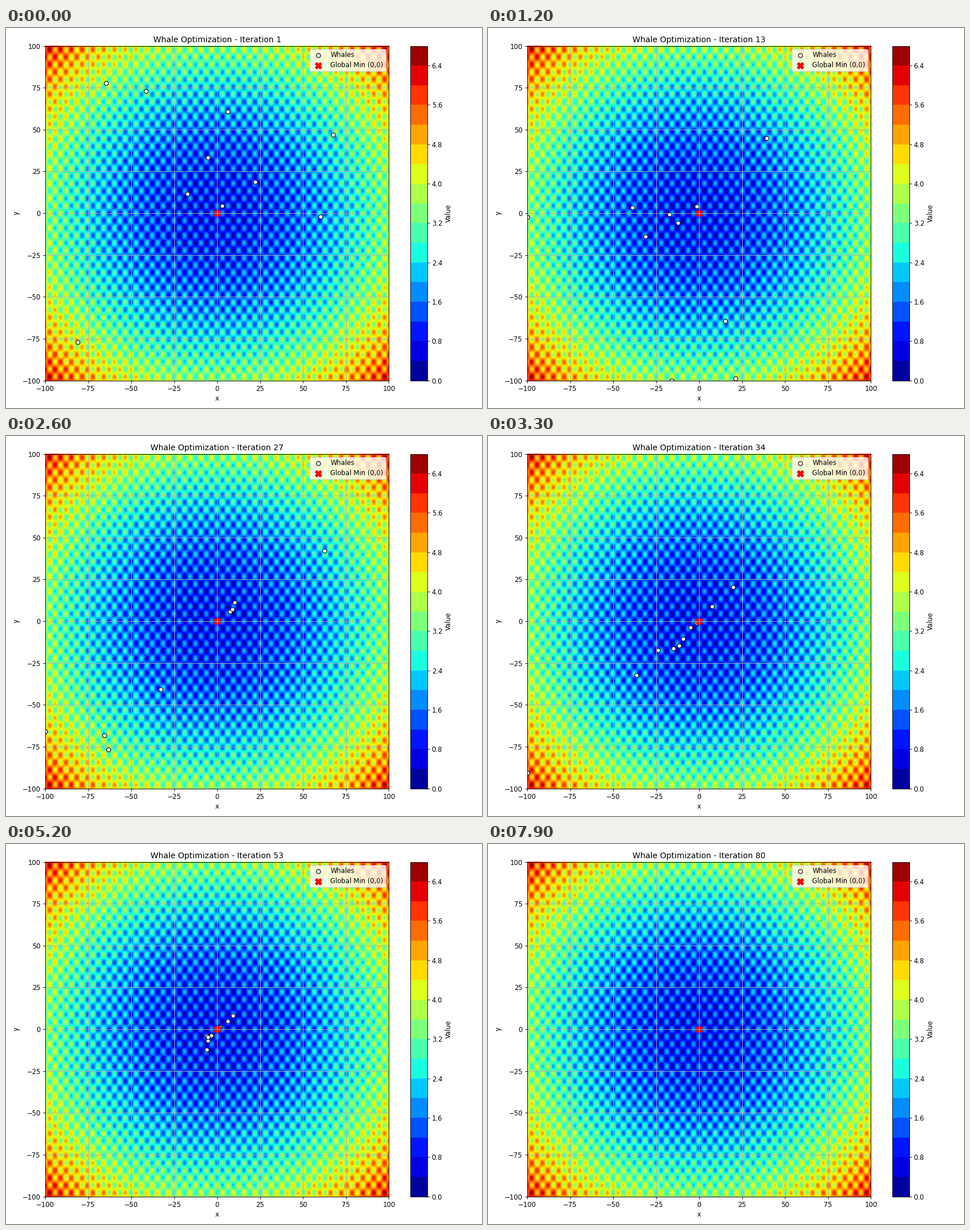
Write a matplotlib script that moves like this. It is 837 px wide and 669 px high and loops after 8 s.

```python
import numpy as np
import matplotlib.pyplot as plt
from matplotlib.animation import FuncAnimation
from matplotlib.cm import ScalarMappable
from matplotlib.colors import BoundaryNorm, ListedColormap

W, H, DPI = 837, 669, 83.7
FRAMES, INTERVAL = 80, 100
BOUND, COUNT = 100, 10
LEFT, RIGHT, BOTTOM, HEIGHT = 69, 824.45, 48.45, 589
WIDTH = 0.8 * (RIGHT - LEFT)  # the colorbar takes the rest
SMOOTH = 3

levels = np.arange(18) * 0.4
bands = len(levels) - 1
cmap = ListedColormap(plt.get_cmap("jet")((np.arange(bands) + 0.5) / bands))
norm = BoundaryNorm(levels, bands)


def griewank(x, y):
    return 1 + (x**2 + y**2) / 4000 - np.cos(x) * np.cos(y / np.sqrt(2))


def pixel_span(start, size):
    """First pixel, pixel count and data values for one side of the plot."""
    first = int(start)
    count = int(np.ceil(start + size)) - first
    px = first + (np.arange(count * SMOOTH) + 0.5) / SMOOTH
    return first, count, ((px - start) / size * 2 - 1) * BOUND


def draw_landscape(fig):
    """Banded function values as a smoothed image behind the axes."""
    x0, nx, xs = pixel_span(LEFT, WIDTH)
    y0, ny, ys = pixel_span(BOTTOM, HEIGHT)
    value = griewank(*np.meshgrid(xs, ys))
    band = np.clip(value / 0.4, 0, bands - 1).astype(int)
    rgb = cmap.colors[:, :3].astype(np.float32)[band]
    rgb = rgb.reshape(ny, SMOOTH, nx, SMOOTH, 3).mean(axis=(1, 3))
    fig.figimage(np.clip(rgb, 0, 1), x0, y0, origin="lower", zorder=-1)


START = [(-64.6, 77.9), (-41.3, 73), (6.3, 60.7), (67.5, 46.8), (-5.4, 33.3),
         (22.1, 18.7), (-17.2, 11.4), (3, 4.3), (60.3, -2.1), (-81.1, -77.1)]


def swarm(t):
    """Whales scatter around the best spot, then line up and close in on it."""
    if t == 0:
        return np.array(START)
    rng = np.random.default_rng(t)
    best = np.array([-4 * np.pi if t < 18 else 0, 0])
    reach = 40 * np.exp(-t / 30) * max(0, 1 - (t / 64) ** 8)
    radius = reach * rng.lognormal(0, 1.3, COUNT) * rng.choice([-1, 1], COUNT)
    turn = max(0.12, np.pi * (1 - t / 20))
    angle = np.pi / 4 + turn * rng.normal(size=COUNT)
    offset = radius * np.array([np.cos(angle), np.sin(angle)])
    return np.clip(best + offset.T, -BOUND, BOUND)


fig = plt.figure(figsize=(W / DPI, (H + 1e-6) / DPI), dpi=DPI)
draw_landscape(fig)

ax = fig.add_axes([LEFT / W, BOTTOM / H, (RIGHT - LEFT) / W, HEIGHT / H],
                  facecolor="none")
bar = fig.colorbar(ScalarMappable(norm, cmap), ax=ax,
                   ticks=levels[::2], label="Value")
bar.minorticks_off()

whales = ax.scatter(*swarm(0).T, s=40, c="white", edgecolors="black", label="Whales")
ax.scatter(0, 0, s=100, c="red", marker="X", label="Global Min (0,0)")
ticks = np.arange(-BOUND, BOUND + 1, 25)
ax.set(xlim=(-BOUND, BOUND), ylim=(-BOUND, BOUND),
       xticks=ticks, yticks=ticks, xlabel="x", ylabel="y")
ax.grid(True)
ax.legend(loc="upper right", borderpad=0.345, labelspacing=0.39)
title = ax.set_title("Whale Optimization - Iteration 1")


def update(t):
    whales.set_offsets(swarm(t))
    title.set_text(f"Whale Optimization - Iteration {t + 1}")
    return whales, title


anim = FuncAnimation(fig, update, frames=FRAMES, interval=INTERVAL,
                     repeat=True, repeat_delay=0)
plt.show()
```
